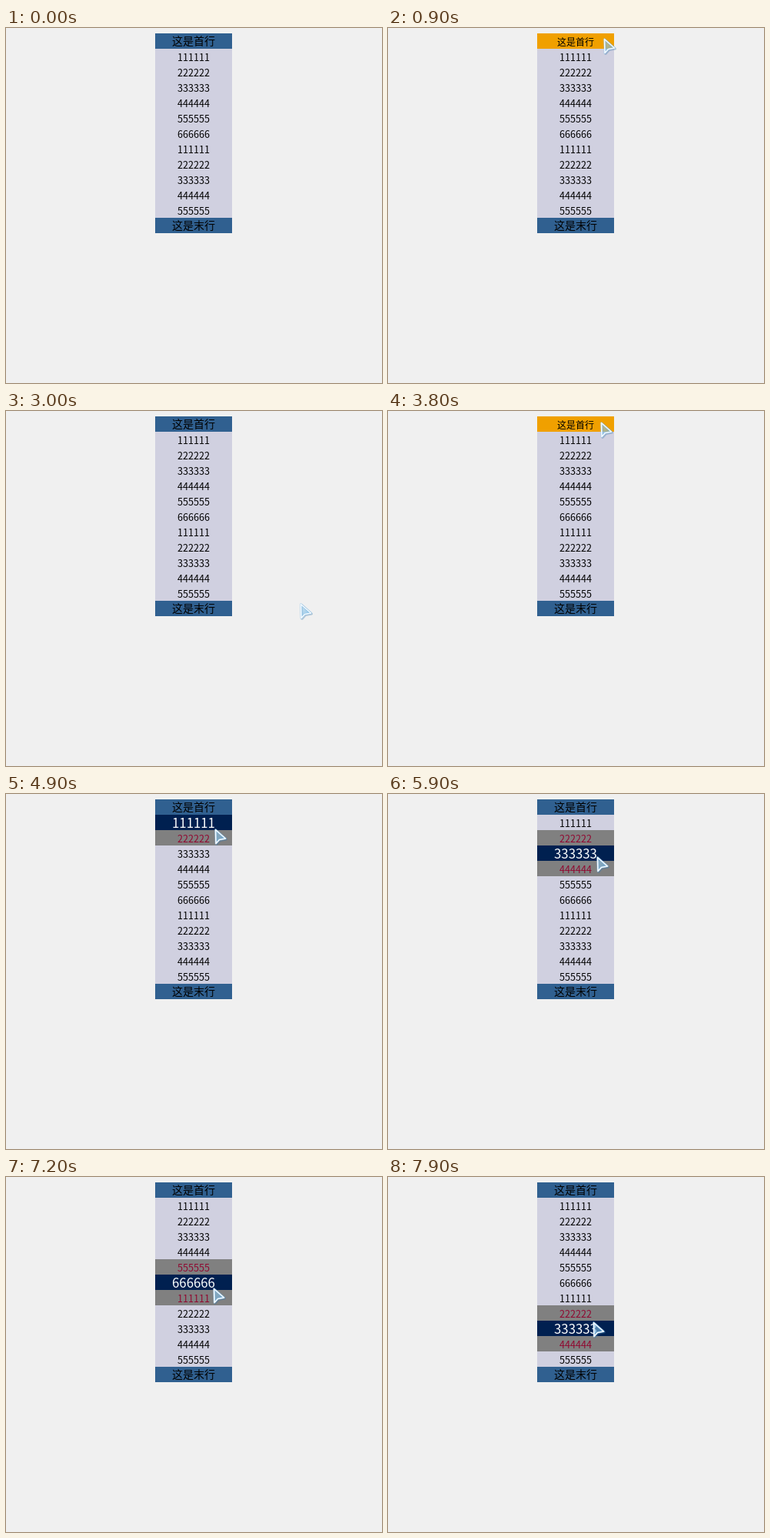
Recreate the animation shown at these times as an HTML page. Size 489 by 462 pixels, loop 8000 ms.

```html
<!DOCTYPE html>
<html lang="zh-CN">
<head>
<meta charset="utf-8">
<title>列表悬停</title>
<style>
html, body { margin: 0; width: 100%; height: 100%; overflow: hidden; background: #f0f0f0; }
#list { position: absolute; left: 194px; top: 7px; width: 100px; }
#list div {
  height: 20px; line-height: 21px; overflow: hidden; text-align: center; white-space: nowrap;
  font-family: "Noto Sans CJK SC", "Noto Sans CJK", sans-serif;
  font-size: 12.6px; color: #000; background: #d0d0e0;
}
#list .end { font-size: 14px; line-height: 18px; background: #306090; }
#list .end.on { font-size: 12px; line-height: 21px; background: #f0a000; }
#list .row.on { font-size: 16.8px; line-height: 20px; color: #fff; background: #002050; }
#list .near { color: #900830; background: #808080; }
#cursor { position: absolute; left: 0; top: 0; overflow: visible; }
</style>
</head>
<body>
<div id="list"></div>
<svg id="cursor" width="20" height="24">
  <defs>
    <linearGradient id="glass" x1="0" y1="0" x2="1" y2="1">
      <stop offset="0" stop-color="#a8d4f0" stop-opacity=".5"/>
      <stop offset="1" stop-color="#58a8e0" stop-opacity=".7"/>
    </linearGradient>
    <path id="arrow" d="M1.5 1.5L2 19.5L6.5 14.5L14.5 13Z" stroke-linejoin="round"/>
  </defs>
  <use href="#arrow" x="1" y="1" fill="none" stroke="#3c78a8" stroke-opacity=".35" stroke-width="3"/>
  <use href="#arrow" fill="none" stroke="#80bce8" stroke-opacity=".6" stroke-width="2.6"/>
  <use href="#arrow" fill="url(#glass)" stroke="#f4faff" stroke-width="1.6"/>
</svg>
<script>
const LOOP = 8000, STEP = 100, ROW = 20, LEFT = 194, TOP = 7, WIDTH = 100;

// Straight pointer moves with rests between them: start ms, end ms, x, y reached
const moves = [
  [0, 900, 280, 13],      // onto the first row
  [1200, 1800, 269, 8],
  [1800, 1900, 354, 15],  // away, then down to the last row
  [2000, 2500, 280, 256],
  [2500, 2800, 408, 257],
  [2900, 3000, 382, 250], // back up to the first row
  [3000, 3700, 296, 20],
  [3700, 3800, 276, 14],
  [4100, 4400, 271, 34],  // down through the numbers
  [4800, 5200, 271, 78],
  [5800, 6300, 271, 95],
  [6400, 6800, 270, 132],
  [7000, 7900, 266, 188]
];

const list = document.getElementById('list');
const cursor = document.getElementById('cursor');

const digits = Array.from({ length: 11 }, (_, i) => String(i % 6 + 1).repeat(6));
const texts = ['这是首行', ...digits, '这是末行'];
const cells = texts.map((text, i) => {
  const cell = document.createElement('div');
  cell.textContent = text;
  cell.base = i % (texts.length - 1) ? 'row' : 'end';
  return list.appendChild(cell);
});

function pointer(t) {
  let x = 495, y = 255;
  for (const [start, end, toX, toY] of moves) {
    const k = Math.min(1, Math.max(0, (t - start) / (end - start)));
    x += (toX - x) * k;
    y += (toY - y) * k;
  }
  return [Math.round(x), Math.round(y)];
}

function draw() {
  const now = performance.now() % LOOP;
  const [x, y] = pointer(Math.floor(now / STEP) * STEP);
  const inside = x >= LEFT && x < LEFT + WIDTH;
  const hover = inside ? Math.floor((y - TOP) / ROW) : -9;
  const onRow = cells[hover]?.base === 'row';
  cells.forEach((cell, i) => {
    const near = onRow && cell.base === 'row' && Math.abs(i - hover) === 1;
    cell.className = cell.base + (i === hover ? ' on' : near ? ' near' : '');
  });
  cursor.style.transform = `translate(${x}px, ${y}px)`;
  requestAnimationFrame(draw);
}
draw();
</script>
</body>
</html>
```
